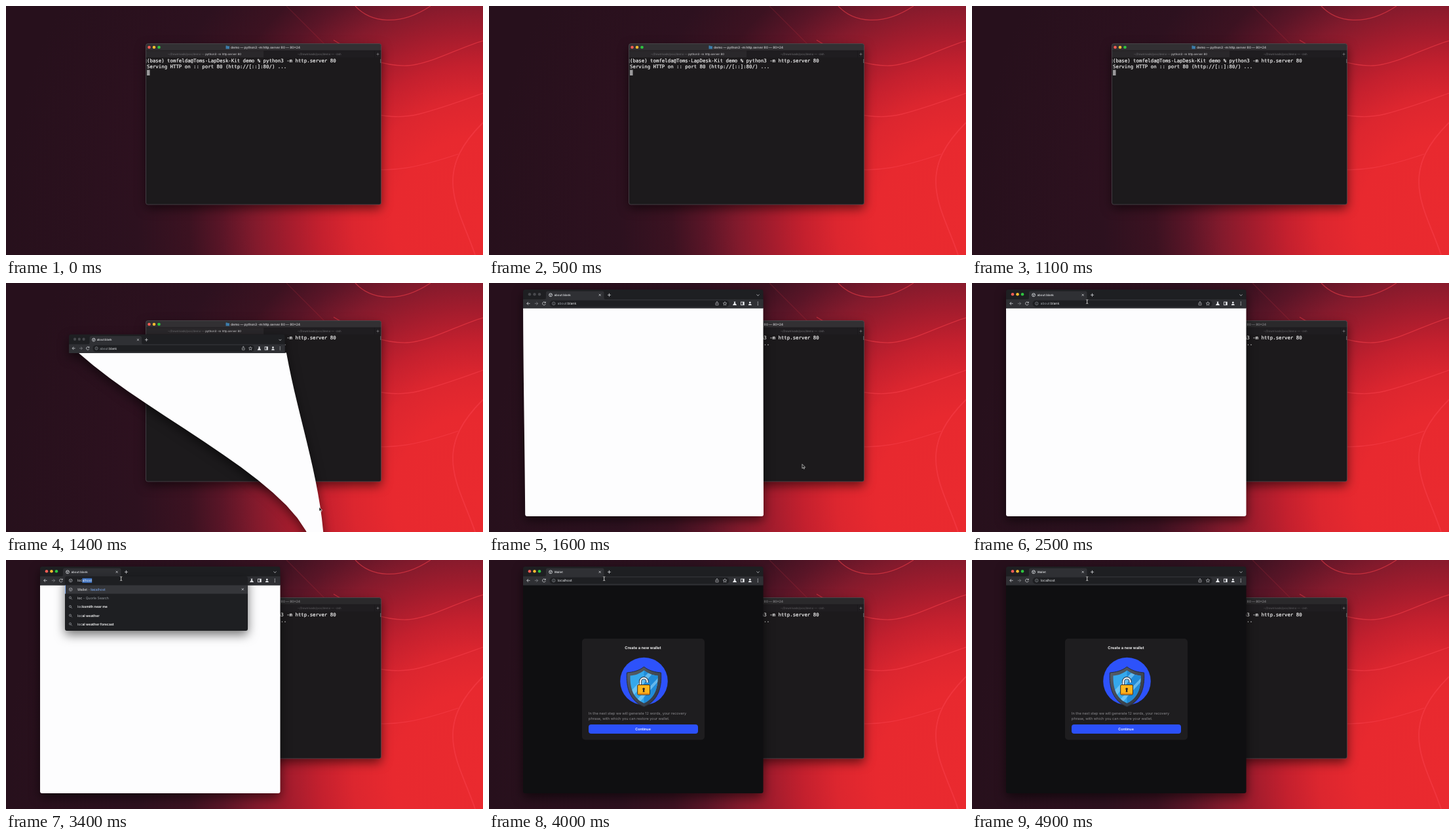
Write an HTML page that moves like this. It is 728 by 380 pixels and loops after 5 s.

```html
<!DOCTYPE html>
<html lang="en">
<head>
<meta charset="utf-8">
<title>Local wallet demo</title>
<style>
html, body { margin: 0; width: 100%; height: 100%; overflow: hidden; background: #24101a; }
#stage { position: relative; width: 728px; height: 380px; overflow: hidden;
  background: radial-gradient(circle at 720px 330px, #ea2a2f 0, #e8292f 130px, #dc262f 190px, #c4202e 240px, #a31c2d 290px, #821a2c 340px, #5a1527 390px, #3c1221 440px, #2d111f 520px, #27101c 720px); }
svg { position: absolute; inset: 0; display: block; }
text { font-family: Inter, "Open Sans", sans-serif; font-size: 5.2px; fill: #e8eaed; text-rendering: geometricPrecision; white-space: pre; }
.mono text { font: 7.39px "DejaVu Sans Mono", monospace; fill: #f6f6f6; stroke: #f6f6f6; stroke-width: .18; }
.b { font-weight: 600; fill: #fff; }
.dim { fill: #9aa0a6; }
.blue { fill: #7fadf5; }
.tab { font-size: 4.4px; fill: #6f6e72; }
.title { font-size: 4.86px; fill: #c6c5c8; }
.ico { fill: none; stroke: #d4d6da; stroke-width: .8; }
.solid { fill: #e8eaed; }
.mid { text-anchor: middle; }
.shadow { filter: drop-shadow(0 6px 8px rgba(0,0,0,.55)); }
#term.off .head { fill: #2a292b; }
#term.off .title { fill: #858487; }
#term.off .tab, #term.off .tab tspan { fill: #626164; }
#chrome.off .light { fill: #47484c; }
</style>
</head>
<body>
<div id="stage">
<svg width="728" height="380" viewBox="0 0 728 380">
  <defs>
    <linearGradient id="steel" x2="1" y2="1"><stop stop-color="#59616c"/><stop offset="1" stop-color="#2c323c"/></linearGradient>
    <clipPath id="inner"><path d="M236.5 168.500C244 174 250 176 257.500 176.500C258 195 253 211 236.500 218.500C220 211 215 195 215.500 176.500C223 176 229 174 236.500 168.500Z"/></clipPath>
  </defs>

  <g fill="none" stroke="#f8404c" stroke-opacity=".55" stroke-width="1.300">
    <path d="M428 0L486 58" stroke-opacity=".15"/>
    <path d="M533 0C556 25 600 32 648 0"/>
    <path d="M500 52C545 80 578 92 612 91C645 90 690 64 728 53"/>
    <path d="M560 165C585 169 605 171 630 165C665 156 700 143 728 133"/>
    <path d="M560 249C590 252 625 248 690 226"/>
    <path d="M728 178C694 212 682 239 682 268C682 305 702 338 716 380" stroke-width="1.800"/>
  </g>

  <g id="term">
    <rect class="shadow" x="213.500" y="57.500" width="359" height="245.500" rx="3" fill="#1c1a1c"/>
    <path class="head" d="M213.500 68V60.500a3 3 0 0 1 3-3H569.500a3 3 0 0 1 3 3V68Z" fill="#323033"/>
    <rect x="213.500" y="68" width="180" height="10.500" fill="#2a282b"/>
    <rect x="393.500" y="68" width="179" height="10.500" fill="#1f1d20"/>
    <path d="M213.500 68H572.500M562.500 68V78.500" stroke="#18171a" stroke-width=".6"/>
    <rect x="213.500" y="57.500" width="359" height="245.500" rx="3" fill="none" stroke="#5c5a5e" stroke-width=".6"/>
    <g id="termLights"></g>
    <path d="M335.500 60.500h2l.7.8h2.800v4.200h-5.500z" fill="#3d7dab"/>
    <text class="title" font-weight="600" x="343" y="64.600">demo — python3 -m http.server 80 — 80×24</text>
    <text class="tab" x="247" y="75">~/Downloads/poc/demo — <tspan fill="#dddcdf">python3 -m http.server 80</tspan></text>
    <text class="tab" x="445" y="75">~/Downloads/poc/demo — -zsh</text>
    <path d="M565.500 73.500h4M567.500 71.500v4" stroke="#8b8a8d" stroke-width=".6"/>
    <g class="mono">
      <text x="215" y="86.300">(base) tomfelda@Toms-LapDesk-Kit demo % python3 -m http.server 80</text>
      <text x="215" y="95.300">Serving HTTP on :: port 80 (http://[::]:80/) ...</text>
    </g>
    <path d="M214.300 81v6M571.700 81v6" stroke="#858487" stroke-width=".7"/>
    <rect x="215" y="97.500" width="4.500" height="8.500" fill="#9b9a9c"/>
  </g>

  <g id="browser">
    <g class="shadow">
      <path id="page" fill="#fdfdfe"/>
      <g id="chrome">
        <path d="M52 38.500V13.500a3.500 3.500 0 0 1 3.500-3.500H415a3.500 3.500 0 0 1 3.500 3.500V38.500Z" fill="#1e1f22"/>
        <path d="M52 25H84.500q2.500 0 2.500-2.500V15q0-2.500 2.500-2.500H173q2.500 0 2.500 2.500v7.500q0 2.500 2.500 2.500H418.500V38.500H52Z" fill="#2f3034"/>
        <rect id="pill" x="92.500" y="26.500" width="274" height="10" rx="5" fill="#1e1f22"/>
        <g id="webLights"></g>
        <g class="ico">
          <circle cx="94" cy="18.300" r="2.500"/><path d="M92 16.800l2 1.200-.5 2M95 16.300l.8 2"/>
          <path d="M167.700 16.800l3 3m0-3l-3 3M181 18.300h5M183.500 15.800v5M408.500 17.500l2 2 2-2"/>
          <path d="M62.500 31.300H57.800M60 29l-2.300 2.300 2.300 2.300"/>
          <path d="M69.800 31.300h4.700M72.300 29l2.300 2.300-2.300 2.300" stroke="#85878b"/>
          <path d="M86 30a2.400 2.400 0 1 0 .2 2.200M86.300 28.500v1.800h-1.800"/>
          <circle cx="98.700" cy="31.300" r="2.300" stroke="#9aa0a6" stroke-width=".6"/><path d="M98.700 31v1.500M98.700 29.800v.6" stroke="#9aa0a6" stroke-width=".6"/>
          <path d="M346.800 30.500h-.8v3.200h4v-3.200h-.8M348 32v-3.700M346.800 29.500l1.200-1.200 1.200 1.200" stroke-width=".6"/>
          <path d="M360 28.600l.8 1.800 2 .2-1.500 1.300.5 2-1.800-1-1.800 1 .5-2-1.500-1.300 2-.2z" stroke-width=".6"/>
          <rect x="384.500" y="29" width="4.800" height="4.600" stroke-width=".9"/>
        </g>
        <g class="solid">
          <path d="M373.700 28.500h2.600v.8h-.4v1.500l2 2.700q.3.500-.3.500h-5.200q-.6 0-.3-.5l2-2.700v-1.500h-.4z"/>
          <path d="M387.200 29h2v4.600h-2z"/>
          <circle cx="398.300" cy="29.900" r="1.400"/><path d="M395.800 34q0-2.200 2.500-2.200t2.500 2.200z"/>
          <circle cx="410.300" cy="29.200" r=".6"/><circle cx="410.300" cy="31.300" r=".6"/><circle cx="410.300" cy="33.400" r=".6"/>
        </g>
        <text id="tabName" x="99.500" y="20" style="font-size:4.5px;font-weight:500"></text>
        <rect id="urlSel" x="104" y="28" width="29.500" height="6.600" fill="#4b80cf"/>
        <text id="url" x="104.500" y="33.200"></text>
      </g>
    </g>

    <g id="wallet">
      <rect x="142" y="120" width="187" height="154.500" rx="5" fill="#1e1d1f"/>
      <text class="b mid" x="235" y="136" style="font-size:5.85px">Create a new wallet</text>
      <circle cx="236.500" cy="185" r="36.300" fill="#2d52fb"/>
      <path d="M236.500 163C245 169.500 253 171 262.500 172C264 195 258 215 236.500 224C215 215 209 195 210.500 172C220 171 228 169.500 236.500 163Z" fill="url(#steel)" stroke="#272c35" stroke-width="1"/>
      <g clip-path="url(#inner)">
        <path d="M210 160h54v62h-54z" fill="#35a8ec"/>
        <path d="M236.500 160h28v62h-28z" fill="#208bd8"/>
        <path d="M210 207L249 166h7L214 214zM222 217L262 176v5L227 220z" fill="#8fd6fa" opacity=".6"/>
      </g>
      <path d="M231 191V185.500a5.300 5.300 0 0 1 10.600 0V187" fill="none" stroke="#27313f" stroke-width="4.200"/>
      <path d="M231 191V185.500a5.300 5.300 0 0 1 10.600 0V187" fill="none" stroke="#e5edf2" stroke-width="2.400"/>
      <rect x="226.700" y="190.500" width="18.800" height="15.300" rx="1.500" fill="#ffb51b" stroke="#3a2e24" stroke-width="1"/>
      <path d="M227.300 203h17.600v2.200h-17.600z" fill="#e98d13"/>
      <circle cx="236.100" cy="196.700" r="1.800" fill="#30261f"/><path d="M235.300 197h1.600l.6 4.500h-2.800z" fill="#30261f"/>
      <g style="--c:#8c8b8f">
        <text x="152" y="235.600" style="font-size:5.55px;fill:var(--c)">In the next step we will generate 12 words, your recovery</text>
        <text x="152" y="243.600" style="font-size:5.55px;fill:var(--c)">phrase, with which you can restore your wallet.</text>
      </g>
      <rect x="152" y="251" width="167" height="14" rx="4" fill="#2b50fa"/>
      <text class="b mid" x="235" y="259.900" style="font-size:5.4px">Continue</text>
    </g>

    <g id="drop">
      <rect class="shadow" x="90" y="25" width="279" height="83" rx="3" fill="#1e1f22"/>
      <rect x="90" y="38.500" width="279" height="13" fill="#35363a"/>
      <path d="M90.500 38.500v13" stroke="#8ab4f8"/>
      <g id="dropIcons" class="ico" style="stroke:#a9adb2;stroke-width:.7"></g>
      <path class="ico" d="M359.800 43.200l3 3m0-3l-3 3"/>
      <rect id="typedSel" y="27.800" height="7" fill="#3f74c4"/>
      <text id="typed" x="109" y="33.200">localhost</text>
      <g id="rows"></g>
    </g>
  </g>

  <path id="arrow" d="M0 0V6.500L1.600 5.100 2.600 7.300 3.500 6.900 2.500 4.800H4.600Z" fill="#111" stroke="#fff" stroke-width=".6"/>
  <g id="beam" fill="none">
    <path d="M-1.500 -3Q0 -3 0 -2V2Q0 3 -1.500 3M1.500 -3Q0 -3 0 -2M0 2Q0 3 1.500 3" stroke="#111" stroke-width="1.600"/>
    <path d="M-1.500 -3Q0 -3 0 -2V2Q0 3 -1.500 3M1.500 -3Q0 -3 0 -2M0 2Q0 3 1.500 3" stroke="#fff" stroke-width=".8"/>
  </g>
</svg>
</div>
<script>
const LOOP = 5000, STEP = 100;
const at = { rise: 1200, genie: 450, front: 1700, focus: 2700, load: 3800 };
const keys = [3000, 3150, 3300];
const win = { l: 52, r: 418.5, t: 10, b: 356, bar: 28.5 };
const dock = { l: 470, r: 486, y: 420 };
// time, x, y
const mouse = [[1200, 478, 410], [1600, 478, 279], [1700, 478, 279], [2400, 175.700, 28.500]];
const words = ["locksmith near me", "local weather", "local weather forecast"];

const $ = id => document.getElementById(id);
const clamp = v => Math.max(0, Math.min(1, v));
const smooth = v => { v = clamp(v); return v * v * (3 - 2 * v); };
const outCubic = v => 1 - (1 - clamp(v)) ** 3;
const mix = (a, b, p) => a + (b - a) * p;
const show = (id, on) => $(id).style.display = on ? "" : "none";
const html = (id, s) => { if ($(id).dataset.s !== s) { $(id).dataset.s = s; $(id).innerHTML = s; } };
const span = (cls, s) => `<tspan class="${cls}">${s}</tspan>`;

const lights = (x, y) => ["#f45d55", "#f8bc30", "#2fc440"].map((c, i) =>
  `<circle class="light" cx="${x + i * 7.5}" cy="${y}" r="2.300" fill="${c}"/>`).join("");
$("termLights").innerHTML = lights(218.5, 63);
$("webLights").innerHTML = lights(62, 17.300);

const globe = y => `<circle cx="98.700" cy="${y}" r="2.400"/><path d="M96.800 ${y - 1.3}l2 1.200-.5 2M99.700 ${y - 2}l.8 2"/>`;
const lens = y => `<circle cx="98" cy="${y - .6}" r="1.500"/><path d="M99.100 ${y + .5}l1.800 1.800"/>`;
$("dropIcons").innerHTML = globe(31.300) + globe(45) + [58, 71.500, 85, 98].map(lens).join("");

function drawWindow(t) {
  const p = (t - at.rise) / at.genie;
  const top = mix(dock.y, win.t, smooth(p / .6));
  const bottom = Math.min(dock.y, top + win.b - win.t);
  const bend = 1 - outCubic((p - .45) / .55);
  const edge = (side, y) => mix(win[side], dock[side], bend * smooth((y - win.t) / (dock.y - win.t)));
  const start = top + win.bar - .5, end = bottom - 3, n = 16;
  const left = [], right = [];
  for (let i = 0; i <= n; i++) {
    const y = mix(start, end, i / n);
    left.unshift(`L${edge("l", y)} ${y}`);
    right.push(`${i ? "L" : "M"}${edge("r", y)} ${y}`);
  }
  const l = edge("l", bottom), r = edge("r", bottom);
  $("page").setAttribute("d", `${right.join("")}Q${r} ${bottom} ${r - 3} ${bottom}L${l + 3} ${bottom}Q${l} ${bottom} ${l} ${end}${left.join("")}Z`);
  const mid = top + win.bar / 2, x = edge("l", mid), scale = (edge("r", mid) - x) / (win.r - win.l);
  $("chrome").setAttribute("transform", `translate(${x} ${top}) scale(${scale} 1) translate(${-win.l} ${-win.t})`);
}

function drawUrl(t) {
  const n = keys.filter(k => t >= k).length, loaded = t >= at.load;
  const focus = t >= at.focus && !loaded;
  html("tabName", loaded ? "Wallet" : "about:blank");
  html("url", loaded ? "localhost" : span("dim", "about:") + span("", "blank"));
  show("urlSel", focus);
  $("pill").setAttribute("stroke", focus ? "#8ab4f8" : "none");
  show("drop", n > 0 && !loaded);
  show("wallet", loaded);
  $("page").setAttribute("fill", loaded ? "#0f0f11" : "#fdfdfe");
  if (!n || loaded) return;
  const head = "localhost".slice(0, n), tail = "localhost".slice(n);
  const used = $("typed").getSubStringLength(0, n);
  $("typedSel").setAttribute("x", 109 + used);
  $("typedSel").setAttribute("width", $("typed").getComputedTextLength() - used);
  const row = (y, s) => `<text x="109" y="${y + 1.900}">${s}</text>`;
  html("rows",
    row(45, "Wallet" + span("dim", " - ") + `<tspan class="blue" font-weight="600">${head}</tspan>` + span("blue", tail)) +
    row(58, head + span("dim", " - Quorle Search")) +
    words.map((w, i) => row([71.500, 85, 98][i], w.slice(0, n) + span("b", w.slice(n)))).join(""));
}

function drawMouse(t) {
  let i = 0;
  while (i < mouse.length - 2 && t >= mouse[i + 1][0]) i++;
  const [t0, x0, y0] = mouse[i], [t1, x1, y1] = mouse[i + 1];
  const p = smooth((t - t0) / (t1 - t0));
  const x = mix(x0, x1, p), y = mix(y0, y1, p), text = y < 37;
  show("arrow", t >= at.rise && !text);
  show("beam", text);
  $(text ? "beam" : "arrow").setAttribute("transform", `translate(${x} ${text ? y : y - 2.500})`);
}

function draw(now) {
  const t = Math.floor(now % LOOP / STEP) * STEP;
  const front = t >= at.front;
  show("browser", t > at.rise);
  $("term").setAttribute("class", front ? "off" : "");
  $("chrome").setAttribute("class", front ? "" : "off");
  drawWindow(t);
  drawUrl(t);
  drawMouse(t);
}

const begin = performance.now();
function tick() {
  draw(performance.now() - begin);
  requestAnimationFrame(tick);
}
tick();
</script>
</body>
</html>
```
